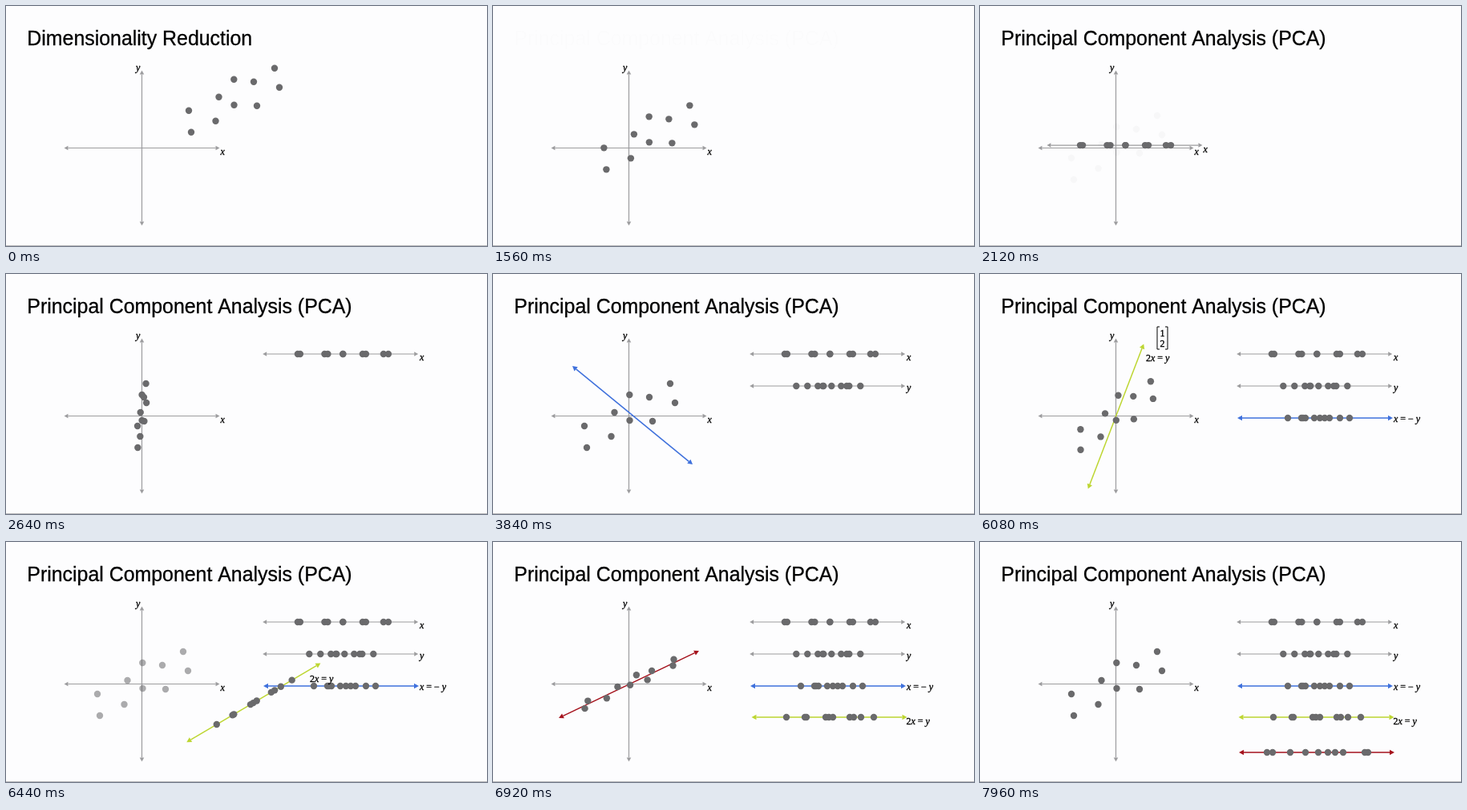
Write an HTML page with a canvas that moves like this. It is 600x300 px and loops after 8000 ms.

```html
<!DOCTYPE html>
<html lang="en">
<head>
<meta charset="utf-8">
<title>Principal Component Analysis</title>
<style>
html, body { margin: 0; width: 100%; height: 100%; overflow: hidden; background: #fdfdfe; }
canvas { display: block; width: 600px; height: 300px; }
</style>
</head>
<body>
<canvas id="stage"></canvas>
<script>
const LOOP = 8000, HALF = 97, DOT = 4.2;
const CX = 169.5, CY = 177.5;
const GREY = '#9c9c9e', INK = '#000', DOTS = '#6a6a6c';
const SERIF = '"Liberation Serif", "Times New Roman", serif';
const SANS = '"Liberation Sans", Arial, sans-serif';

const canvas = document.getElementById('stage');
const ctx = canvas.getContext('2d');
const ratio = window.devicePixelRatio || 1;
canvas.width = 600 * ratio;
canvas.height = 300 * ratio;

// centred data, and its offset before centring
const points = [[114, 190], [117, 217], [147.5, 203], [151.5, 173], [170.3, 151],
  [170.5, 183], [195, 154], [199, 184], [221, 137], [227, 161]];
const OFFSET = [114, -59.2];

// each view: a direction, its resting row, and the times [start, end] of its phases
const views = [
  { color: GREY, at: [CX, CY], angle: 0, row: [417.2, 100], slide: 2.2,
    u: points.map(p => p[0] - CX), project: [1880, 2082], move: [2090, 2320],
    label: 'x', from: [267.5, 186], to: [516, 108] },
  { color: GREY, at: [CX, CY], angle: -Math.PI / 2, row: [417.2, 140], slide: 0.6,
    u: points.map(p => CY - p[1]), project: [2480, 2682], move: [2720, 3040],
    label: 'y', from: [162, 81], to: [516, 146] },
  { color: '#3e70dc', at: [174, 176.6], angle: Math.atan2(123, 150), row: [418, 180], slide: 0,
    u: [-34, -12, -1, -17, -15, 6, 12, 31, 18, 43],
    show: [3600, 3800], text: [3880, 4040], matrix: [4220, 4400],
    project: [4720, 5000], move: [5140, 5440],
    label: 'x = − y', from: [254, 244], to: [516, 185],
    bracket: [254.5, 275.5, 250, 279], cells: ['1', '−1'] },
  { color: '#bdd631', at: [169.5, 178], angle: Math.atan2(-180, 69), row: [419.5, 219], slide: 0,
    u: [-30.5, -53.5, -28.5, -0.5, 25.5, -4.5, 30.5, 4.5, 55.5, 39.5],
    show: [5480, 5600], text: [5620, 5740], matrix: [5680, 5800],
    project: [6000, 6240], move: [6280, 6580],
    label: '2x = y', from: [207, 109], to: [515.5, 228],
    bracket: [221, 234, 66, 94], cells: ['1', '2'] },
  { color: '#a5121d', at: [169.5, 178], angle: Math.atan2(-84, 175), row: [420, 263], slide: 0,
    u: [-55, -62, -33, -14, 14, 2, 33, 23, 64, 60],
    show: [6600, 6700], project: [6765, 7005], move: [7240, 7560] }
];

const mix = (a, b, k) => a + (b - a) * k;
const ramp = (t, [a, b]) => Math.min(1, Math.max(0, (t - a) / (b - a)));
const ease = (t, span) => (1 - Math.cos(Math.PI * ramp(t, span))) / 2;

function withAlpha(alpha, draw) {
  if (alpha <= 0) return;
  ctx.save();
  ctx.globalAlpha = alpha;
  draw();
  ctx.restore();
}

// a hairline outline gives the text a little more weight
function text(str, x, y, font, align = 'left') {
  ctx.fillStyle = ctx.strokeStyle = INK;
  ctx.lineWidth = 0.3;
  ctx.font = font;
  ctx.textAlign = align;
  ctx.fillText(str, x, y);
  ctx.strokeText(str, x, y);
}

// letters are italic, digits and signs upright
function formula(str, x, y) {
  for (const ch of str) {
    text(ch, x, y, `${/[a-z]/.test(ch) ? 'italic ' : ''}12px ${SERIF}`);
    x += ctx.measureText(ch).width;
  }
}

function dot(x, y) {
  ctx.fillStyle = DOTS;
  ctx.beginPath();
  ctx.arc(x, y, DOT, 0, 7);
  ctx.fill();
}

function arrowLine(x, y, angle, color) {
  const size = color === GREY ? 5 : 6;
  ctx.save();
  ctx.translate(x, y);
  ctx.rotate(angle);
  ctx.strokeStyle = ctx.fillStyle = color;
  ctx.lineWidth = color === GREY ? 1.2 : 1.5;
  ctx.beginPath();
  ctx.moveTo(size - HALF, 0);
  ctx.lineTo(HALF - size, 0);
  ctx.stroke();
  for (const s of [-1, 1]) {
    ctx.beginPath();
    ctx.moveTo(s * HALF, 0);
    ctx.lineTo(s * (HALF - size), -size * 0.55);
    ctx.lineTo(s * (HALF - size), size * 0.55);
    ctx.fill();
  }
  ctx.restore();
}

function matrix({ bracket: [l, r, top, bottom], cells }) {
  ctx.strokeStyle = INK;
  ctx.lineWidth = 1;
  for (const [x, lip] of [[l, 3], [r, -3]]) {
    ctx.beginPath();
    ctx.moveTo(x + lip, top);
    ctx.lineTo(x, top);
    ctx.lineTo(x, bottom);
    ctx.lineTo(x + lip, bottom);
    ctx.stroke();
  }
  cells.forEach((c, i) => text(c, (l + r) / 2, top + 11.5 + i * 13.5, `12px ${SERIF}`, 'center'));
}

function drawView(v, t) {
  const m = ease(t, v.move);
  const x = mix(v.at[0], v.row[0], m), y = mix(v.at[1], v.row[1], m);
  const angle = v.angle * (1 - m);
  const shown = v.show ? ramp(t, v.show) : +(m > 0);
  withAlpha(shown, () => arrowLine(x, y, angle, v.color));
  if (m > 0) {
    for (const u of v.u) {
      const d = u + v.slide * m;
      dot(x + d * Math.cos(angle), y + d * Math.sin(angle));
    }
  }
  if (v.label) {
    withAlpha(v.text ? ramp(t, v.text) : shown, () =>
      formula(v.label, mix(v.from[0], v.to[0], m), mix(v.from[1], v.to[1], m)));
  }
  if (v.cells) withAlpha(ramp(t, v.matrix) * (1 - ramp(m, [0, 0.5])), () => matrix(v));
}

function drawData(t) {
  const shift = 1 - ease(t, [1400, 1632]);
  const active = views.find(v => t >= v.project[0] && t < v.move[1]);
  const moving = active ? ease(t, active.move) : 0;
  const k = active && !moving ? ease(t, active.project) : 0;
  withAlpha(moving || 1, () => points.forEach(([px, py], i) => {
    let x = px + OFFSET[0] * shift, y = py + OFFSET[1] * shift;
    if (k) {
      x = mix(x, active.at[0] + active.u[i] * Math.cos(active.angle), k);
      y = mix(y, active.at[1] + active.u[i] * Math.sin(active.angle), k);
    }
    dot(x, y);
  }));
}

function drawTitle(str, alpha) {
  withAlpha(alpha, () => text(str, 26.3, 49, `24.9px ${SANS}`));
}

function draw(t) {
  ctx.setTransform(ratio, 0, 0, ratio, 0, 0);
  ctx.fillStyle = '#fdfdfe';
  ctx.fillRect(0, 0, 600, 300);
  ctx.fillStyle = '#bcbcbe';
  ctx.fillRect(0, 299, 600, 1);

  drawTitle('Dimensionality Reduction', 1 - ramp(t, [1400, 1540]));
  drawTitle('Principal Component Analysis (PCA)', ramp(t, [1560, 1680]));

  arrowLine(CX, CY, 0, GREY);
  arrowLine(CX, CY, -Math.PI / 2, GREY);
  formula('x', 267.5, 186);
  formula('y', 162, 81);

  views.forEach(v => drawView(v, t));
  drawData(t);
}

const start = performance.now();
function tick() {
  draw((performance.now() - start) % LOOP);
  requestAnimationFrame(tick);
}
tick();
</script>
</body>
</html>
```
